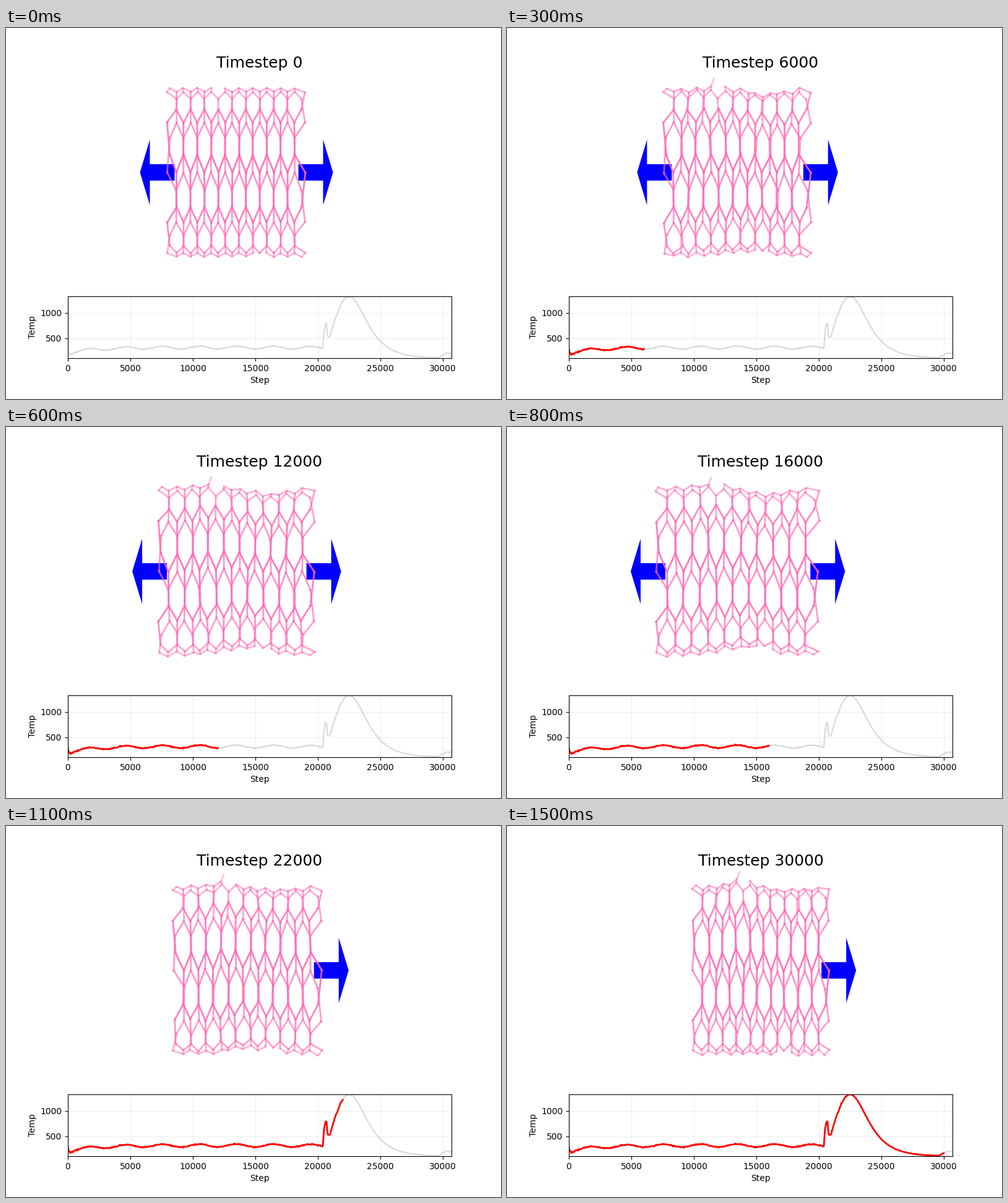
Animation, 800 px wide and 600 px high, one loop 1.6 s. Source, as a matplotlib script:

```python
import numpy as np
import matplotlib.pyplot as plt
from matplotlib.animation import FuncAnimation
from matplotlib.collections import LineCollection
from matplotlib.colors import to_rgb

FRAMES, STEP = 16, 2000
RINGS, GROUPS = 20, 5
RADIUS, MID_Y = 137.0, 233.5
BREAK = 20400


def build_tube():
    """Armchair lattice: relative x, angle and bonded index pairs."""
    u, phi, bonds = [], [], []

    def index(ring, group, kind):
        return (ring * GROUPS + group % GROUPS) * 2 + kind

    for i in range(RINGS):
        odd = i % 2
        for g in range(GROUPS):
            for kind in (0, 1):
                u.append(0.018 + 0.955 * i / (RINGS - 1))
                phi.append(12 + 36 * odd + 72 * g + 24 * kind)
            bonds.append((index(i, g, 0), index(i, g, 1)))
            if i < RINGS - 1:
                bonds.append((index(i, g, 0), index(i + 1, g - 1 + odd, 1)))
                bonds.append((index(i, g, 1), index(i + 1, g + odd, 0)))
    u = np.array(u)
    # Every second atom flares outwards on the end rings
    u[1:2 * GROUPS:2] = 0
    u[1 - 2 * GROUPS::2] = 1
    return u, np.radians(phi), np.array(bonds)


U, PHI, BONDS = build_tube()


def nearest(u, degrees):
    turn = np.angle(np.exp(1j * (PHI - np.radians(degrees))))
    return int(np.argmin(((U - u) * 10) ** 2 + (turn * 3) ** 2))


# Vacancies in the lattice, and the atom that carries the loose end
HOLES = [nearest(0.39, 72), nearest(0.72, 276)]
LOOSE = nearest(0.34, 90)
BONDS = BONDS[~np.isin(BONDS, HOLES).any(axis=1)]
KEEP = np.setdiff1d(np.arange(len(U)), HOLES)


def tint(depth):
    """Pink that is densest in the middle, a little more so in front."""
    rgba = np.empty((len(depth), 4))
    rgba[:, :3] = to_rgb("hotpink")
    rgba[:, 3] = 0.42 + 0.38 * np.abs(depth) + 0.1 * depth
    return rgba


def ends(n):
    """Left end creeps out, then springs back; right end is pulled on."""
    if n * STEP < BREAK:
        left = 260.5 - 2.4 * n
    else:
        left = 303 - 32.5 * np.exp(-(n - 11) / 1.6)
    return left, 483.5 + 2.45 * n


def bump(center, width):
    return np.exp(-((U - center) / width) ** 2)


def atoms(n):
    left, right = ends(n)
    rng = np.random.default_rng(50 + n)
    shake = 0.3 if n == 0 else 0.8
    top = (9.5 * abs(np.sin(np.pi * n / 13)) * bump(0.7, 0.17)
           - 0.8 * n * bump(0.34, 0.12))
    bottom = -12 * np.sin(np.pi * n / 15) * bump(0.55, 0.2)
    side = (1 + np.sin(PHI)) / 2
    x = left + U * (right - left) + rng.normal(0, shake, len(U))
    y = MID_Y - RADIUS * np.sin(PHI) + side * top + (1 - side) * bottom
    y += rng.normal(0, 1.3 * shake, len(U))
    return np.column_stack([x, y])


def arrow(tip, way):
    back = [0, 16, 16, 56, 56, 16, 16]
    half = [0, -53, -13.3, -13.3, 13.3, 13.3, 53]
    return [(tip - way * b, MID_Y + h) for b, h in zip(back, half)]


def temperature():
    """Slow noisy waves, a short spike, then a burst and long cooling."""
    t = np.arange(0, 30701, 50)
    waves = (314 + 29 * np.cos(2 * np.pi * (t - 4600) / 2960)
             - 110 * np.exp(-t / 2000) + 125 * np.exp(-t / 30))
    rng = np.random.default_rng(4)
    waves += rng.normal(0, 1, len(t)) * (5 + 15 * np.exp(-t / 300))
    spike = np.interp(t, [BREAK, 20500, 20620, 20700, 20780, 20950],
                      [285, 640, 790, 790, 530, 525])
    rise = 525 + 797 * np.sin(np.pi / 2 * (t - 20950) / 1550)
    rise += rng.normal(0, 8, len(t))
    cooling = 105 + 1217 / np.cosh((t - 22500) / 1280)
    cooling += 95 * np.clip((t - 29600) / 700, 0, 1)
    return t, np.select([t <= BREAK, t <= 20950, t <= 22300],
                        [waves, spike, rise], cooling)


fig = plt.figure(figsize=(8, 6), dpi=100)
grid = fig.add_gridspec(2, 1, height_ratios=[3, 1], hspace=0.3)

# Upper panel works in stage pixels
tube_ax = fig.add_subplot(grid[0])
tube_ax.axis("off")
title = tube_ax.set_title("", fontsize=18)
arrows = [tube_ax.fill([0, 1, 1], [0, 0, 1], color="blue", lw=0, zorder=1)[0]
          for _ in range(2)]
bond_depth = np.append(np.cos(PHI)[BONDS].mean(axis=1), 0)
bond_lines = LineCollection([], colors=tint(bond_depth), linewidths=2,
                            zorder=2)
tube_ax.add_collection(bond_lines, autolim=False)
dots = tube_ax.scatter(U[KEEP], U[KEEP], s=8, c=tint(np.cos(PHI[KEEP])),
                       linewidths=0, zorder=3)
tube_ax.set(xlim=(100, 720), ylim=(373.3, 72))

temp_ax = fig.add_subplot(grid[1])
steps, temps = temperature()
temp_ax.plot(steps, temps, color="gray", alpha=0.3)
red_line, = temp_ax.plot([], [], color="red", lw=2)
temp_ax.set(xlim=(0, 30700), ylim=(105, 1329), xlabel="Step", ylabel="Temp")
temp_ax.grid(alpha=0.2)


def draw(n):
    now = n * STEP
    pts = atoms(n)
    segments = list(pts[BONDS])
    if n > 0:
        segments.append(np.array([pts[LOOSE], pts[LOOSE] + (5, -13)]))
    bond_lines.set_segments(segments)
    dots.set_offsets(pts[KEEP])
    arrows[0].set_xy(arrow(216.5 - 2.07 * n, -1))
    arrows[0].set_visible(now < BREAK)
    arrows[1].set_xy(arrow(528.5 + 2.05 * n + 0.022 * n * n, 1))
    shown = steps <= now if n else steps < 0
    red_line.set_data(steps[shown], temps[shown])
    title.set_text(f"Timestep {now}")
    return [bond_lines, dots, *arrows, red_line, title]


anim = FuncAnimation(fig, draw, frames=FRAMES, interval=100, repeat=True,
                     repeat_delay=0, blit=False)
plt.show()
```
